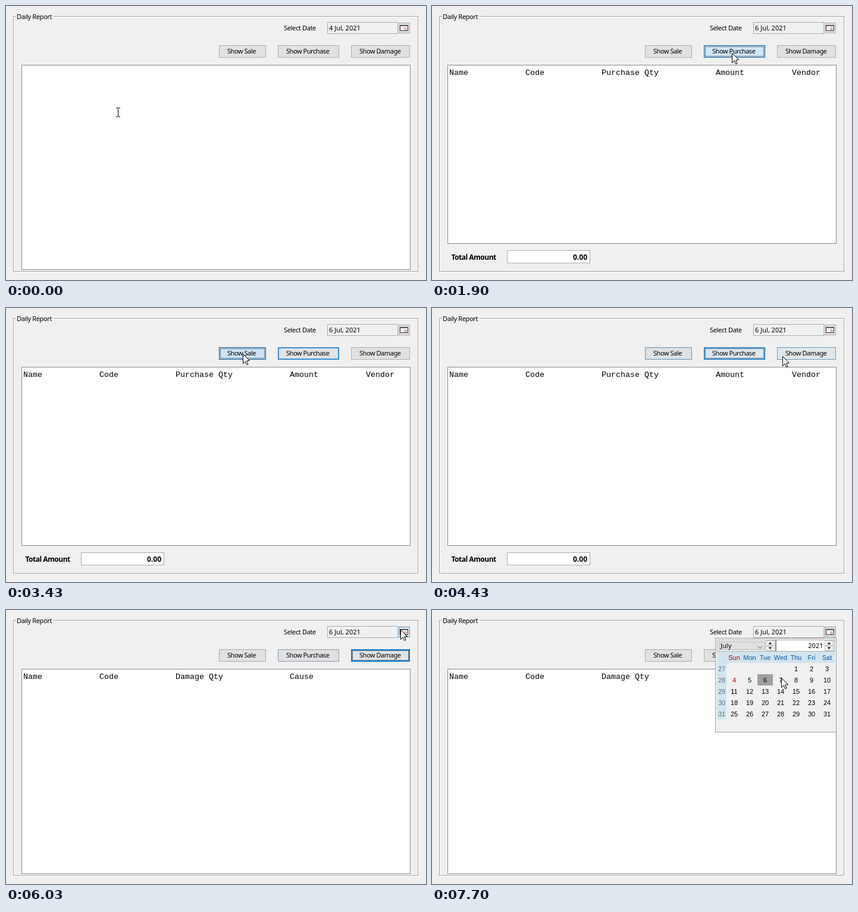
Animation of 706x461 px, one loop 8 s. Source, as an HTML page with a canvas:

```html
<!DOCTYPE html>
<html lang="en">
<head>
<meta charset="utf-8">
<title>Daily Report</title>
<style>
html, body { margin: 0; width: 100%; height: 100%; overflow: hidden; background: #f0f0f0; }
canvas { display: block; }
</style>
</head>
<body>
<canvas id="stage" width="706" height="461"></canvas>
<script>
const ctx = document.getElementById('stage').getContext('2d');
const LOOP = 8000, STEP = 200 / 3, PRESS = 140;
const UI = '11px "Noto Sans", "Open Sans", sans-serif';
const BOLD = 'bold 12px "Noto Sans", "Open Sans", sans-serif';
const MONO = '13.333px "Liberation Mono", monospace';
const CAL = '11px "Liberation Sans", sans-serif';

// Button looks: fill, border, inner border, and the share of the fade done per step
const GREY = [225, 225, 225], BLUE = [0, 120, 215];
const PALE = [229, 241, 251], DEEP = [204, 228, 247];
const LOOKS = {
  normal: { colors: [GREY, [173, 173, 173], GREY], rate: .12 },
  hover: { colors: [PALE, BLUE, PALE], rate: .2 },
  pressed: { colors: [DEEP, [0, 84, 153], DEEP], rate: .8 },
  focused: { colors: [GREY, BLUE, BLUE], rate: .12 }
};

const SALE = { label: 'Show Sale', x: 358, y: 66, w: 79, h: 21 };
const PURCHASE = { label: 'Show Purchase', x: 457, y: 66, w: 103, h: 21 };
const DAMAGE = { label: 'Show Damage', x: 580, y: 66, w: 99, h: 21 };
const PICKER = { x: 660, y: 28, w: 19, h: 18 };
const CLICKS = [[1760, PURCHASE], [3360, SALE], [3830, PURCHASE], [4960, DAMAGE], [6630, PICKER]];

// Turning points of the pointer: time, x, y
const PATH = [
  [500, 566, 118], [700, 567, 119], [900, 561, 109], [1230, 513, 88], [1500, 504, 79],
  [2230, 504, 79], [2500, 315, 97], [2730, 200, 105], [3100, 385, 65], [3430, 397, 77],
  [3830, 500, 82], [4430, 589, 81], [4830, 622, 77], [5700, 655, 53], [6030, 663, 33],
  [6700, 668, 36], [7430, 597, 126], [7570, 581, 120], [7700, 587, 114]
];

const mix = (a, b, k) => a.map((v, i) => v + (b[i] - v) * k);

function box(x, y, w, h, fill, line) {
  if (fill) { ctx.fillStyle = fill; ctx.fillRect(x, y, w, h); }
  if (line) { ctx.strokeStyle = line; ctx.strokeRect(x + .5, y + .5, w - 1, h - 1); }
}

function text(s, x, y, { font = UI, color = '#000', align = 'left', spacing = 0 } = {}) {
  ctx.font = font;
  ctx.fillStyle = color;
  ctx.textAlign = align;
  ctx.letterSpacing = spacing + 'px';
  ctx.fillText(s, x, y);
}

function poly(points, fill, line) {
  ctx.beginPath();
  points.forEach(([x, y]) => ctx.lineTo(x, y));
  if (fill) { ctx.closePath(); ctx.fillStyle = fill; ctx.fill(); }
  if (line) { ctx.strokeStyle = line; ctx.stroke(); }
}

function dots(x, y, w, h) {
  for (let i = 0; i < w; i += 2) { box(x + i, y, 1, 1, '#000'); box(x + i, y + h - 1, 1, 1, '#000'); }
  for (let i = 0; i < h; i += 2) { box(x, y + i, 1, 1, '#000'); box(x + w - 1, y + i, 1, 1, '#000'); }
}

function pointerAt(t) {
  const next = PATH.findIndex(p => p[0] > t);
  if (next < 1) return PATH[next ? PATH.length - 1 : 0].slice(1);
  const a = PATH[next - 1], b = PATH[next];
  return mix(a, b, (t - a[0]) / (b[0] - a[0])).slice(1).map(Math.round);
}

function hasFocus(b, t) {
  const last = CLICKS.filter(([at, target]) => at <= t && target !== PICKER).pop();
  return !!last && last[1] === b;
}

function lookName(b, t) {
  const [x, y] = pointerAt(t);
  if (CLICKS.some(([at, target]) => target === b && t >= at && t < at + PRESS)) return 'pressed';
  if (x >= b.x && x < b.x + b.w && y >= b.y && y < b.y + b.h) return 'hover';
  return hasFocus(b, t) ? 'focused' : 'normal';
}

// Replays the fades up to time t, so the result depends on t alone.
function fadedColors(b, t) {
  let colors = LOOKS.normal.colors;
  for (let s = 1100; s <= t + 1; s += STEP) {
    const look = LOOKS[lookName(b, s)];
    colors = colors.map((c, i) => mix(c, look.colors[i], look.rate));
  }
  return colors.map(c => `rgb(${c.map(Math.round)})`);
}

function button(b, t) {
  const { x, y, w, h, label } = b;
  const [fill, border, inner] = fadedColors(b, t);
  box(x, y, w, h, fill, border);
  box(x + 1, y + 1, w - 2, h - 2, null, inner);
  if (hasFocus(b, t)) dots(x + 2, y + 2, w - 4, h - 4);
  if (label) text(label, x + 14, y + 14, { spacing: -.45 });
}

function dateRow(t) {
  text('Select Date', 467, 41, { spacing: -.35 });
  box(540, 27, 119, 20, '#f0f0f0', '#adadad');
  text(`${t < 900 ? 4 : 6} Jul, 2021`, 543, 41);
  button(PICKER, t);
  box(662, 32, 14, 10, '#f4eeee', '#333');
  box(663, 33, 12, 1, '#8a8a8a');
  ctx.strokeStyle = '#c45a5a';
  ctx.beginPath();
  ctx.arc(671.5, 38.5, 1.6, 0, 7);
  ctx.stroke();
}

function report(t) {
  const total = t >= 1830 && t < 5100;
  box(26, 99, 654, total ? 301 : 345, '#fff', '#828790');
  if (t < 1830) return;
  const heads = total
    ? { Name: 0, Code: 16, 'Purchase Qty': 32, Amount: 56, Vendor: 72 }
    : { Name: 0, Code: 16, 'Damage Qty': 32, Cause: 56 };
  for (const h in heads) text(h, 29 + heads[h] * 8, 116, { font: MONO });
  if (!total) return;
  text('Total Amount', 32.5, 427, { font: BOLD, spacing: -.5 });
  box(126, 411, 140, 22, '#fff', '#abadb3');
  text('0.00', 261, 427, { font: BOLD, align: 'right' });
}

function spinner(x) {
  const m = x + 7.5;
  for (const side of [-1, 1]) {
    box(x, side < 0 ? 51 : 60, 15, 9, '#f0f0f0', '#c4c4c4');
    poly([[m - 3, 60 + side * 2.5], [m, 60 + side * 6], [m + 3, 60 + side * 2.5]], '#222');
  }
}

function calendar(selected) {
  box(476, 47, 204, 159, '#f0f0f0', '#a0a0a0');
  box(479, 50, 198, 20, '#f7f7f7', '#adadad');
  box(482, 53, 78, 14, '#e1e1e1', '#adadad');
  text('July', 485, 64);
  poly([[547.5, 60.5], [551.5, 64.5], [555.5, 60.5]], null, '#444');
  spinner(561);
  box(577, 50, 2, 20, '#8c8c8c');
  box(579, 51, 81, 18, '#fff');
  text('2021', 657.5, 64, { align: 'right' });
  spinner(660);

  const cell = (s, x, y, color) => text(s, x, y, { font: CAL, color, align: 'center' });
  box(479, 70, 198, 19, '#d2e4ee');
  box(479, 89, 16, 95, '#d2e4ee');
  'Sun Mon Tue Wed Thu Fri Sat'.split(' ').forEach((d, i) =>
    cell(d, 508 + i * 26, 84, i ? '#005aa4' : '#a40000'));
  for (let r = 0; r < 5; r++) cell(27 + r, 487, 103 + r * 19, '#5f717d');
  for (let day = 1; day <= 31; day++) {
    const slot = day + 3; // the month starts on a Thursday
    const x = 508 + slot % 7 * 26, y = 103 + Math.floor(slot / 7) * 19;
    if (day === selected) box(x - 13, y - 14, 26, 19, '#a0a0a0');
    cell(day, x, y, day === 4 ? '#c00000' : '#000');
  }
}

function textCursor(x, y) {
  box(x, y - 7, 1, 14, '#000');
  for (const end of [y - 8, y + 7]) {
    box(x - 3, end, 3, 1, '#000');
    box(x + 1, end, 3, 1, '#000');
  }
}

function arrow([x, y]) {
  ctx.save();
  ctx.translate(x + .5, y + .5);
  poly([[0, 0], [0, 16], [3.7, 12.5], [6.3, 18], [8.5, 17], [6.2, 11.5], [11, 11], [0, 0]], '#fff', '#000');
  ctx.restore();
}

function draw(t) {
  box(0, 0, 706, 461, '#f0f0f0');
  box(13, 18, 681, 430, null, '#fff');
  box(12, 17, 681, 430, null, '#a0a0a0');
  box(17, 16, 63, 4, '#f0f0f0');
  text('Daily Report', 18, 22, { spacing: -.35 });
  dateRow(t);
  for (const b of [SALE, PURCHASE, DAMAGE]) button(b, t);
  report(t);
  if (t >= 500 && t < 900) calendar(4);
  if (t >= 6690) calendar(6);
  if (t < 500) textCursor(188, 179);
  else arrow(pointerAt(t));
}

// Few updates at first, then 15 steps a second.
function stepped(t) {
  if (t < 500) return 0;
  if (t < 1100) return 500 + Math.min(2, Math.floor((t - 500) / 200)) * 200;
  return 1100 + Math.floor((t + 6.7 - 1100) / STEP) * STEP;
}

const start = performance.now();
function tick() {
  draw(stepped((performance.now() - start) % LOOP));
  requestAnimationFrame(tick);
}
tick();
</script>
</body>
</html>
```
